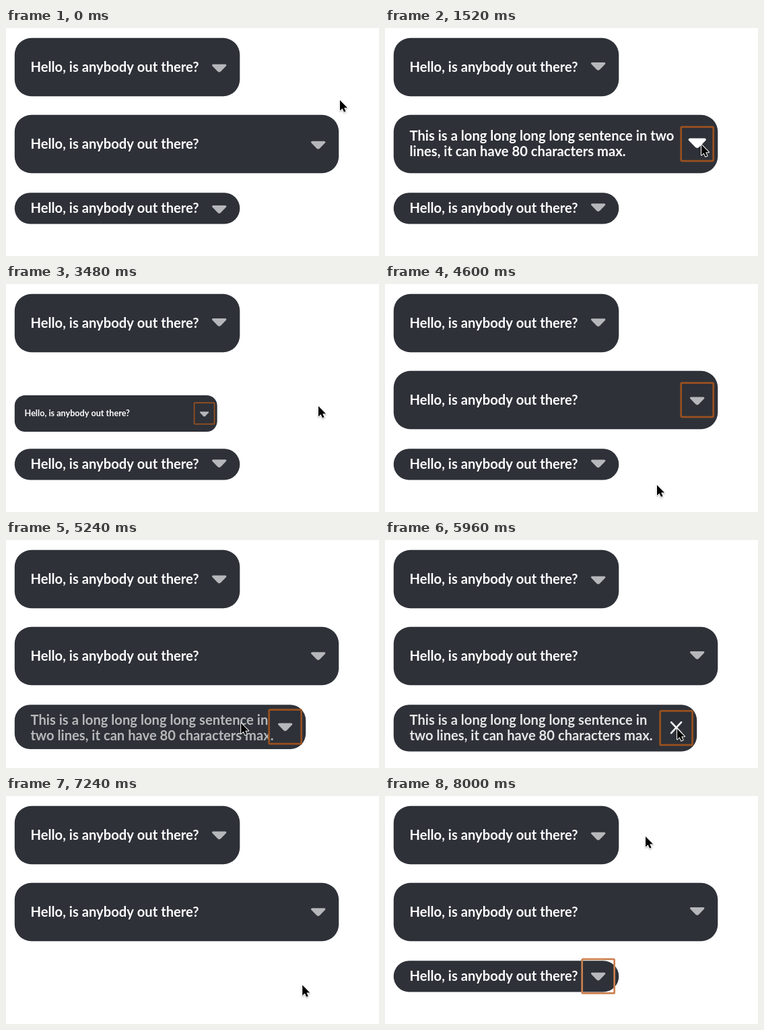
Animation, 554 px wide and 338 px high, one loop 8040 ms. Source, as an HTML page with a canvas:

```html
<!DOCTYPE html>
<html lang="en">
<head>
<meta charset="utf-8">
<title>Speech bubbles</title>
<style>
html, body { margin: 0; width: 100%; height: 100%; overflow: hidden; background: #fff; }
canvas { display: block; width: 554px; height: 338px; }
</style>
</head>
<body>
<canvas id="stage"></canvas>
<script>
const W = 554, H = 338, LOOP = 8040;
const LINE = 23, FADE = 170, POP = 420, CLOSE = 280;
const canvas = document.getElementById('stage');
const ctx = canvas.getContext('2d');
const dpr = window.devicePixelRatio || 1;
canvas.width = W * dpr;
canvas.height = H * dpr;

const hello = ['Hello, is anybody out there?'];
const bubbles = [
  { x: 12.8, y: 14.8, w: 334.5, h: 86.4, r: 25, texts: [hello] },
  {
    x: 12.8, y: 128.8, w: 481.5, h: 86.4, r: 25,
    clicks: [700, 1900, 2600], reopen: 3410, blur: 4960, phase: 500,
    texts: [hello,
      ['This is a long long long long sentence in two', 'lines, it can have 80 characters max.'],
      ["This is the last sentence that's super super", 'super super super long and has 3 lines. it', 'can have 120 characters max.']]
  },
  {
    x: 12.8, y: 244.2, w: 334.5, h: 46.3, r: 23, grow: 450.4,
    clicks: [4960, 5940, 6760], reopen: 7540, blur: LOOP, phase: 250,
    texts: [hello,
      ['This is a long long long long sentence in', 'two lines, it can have 80 characters max.'],
      ["This is the last sentence that's super", 'super super super super long and has 3', 'lines. it can have 120 characters max.']]
  }
];

// time, x, y of the pointer tip
const path = [
  [0, 496, 107], [120, 494, 112], [560, 470, 173], [1640, 470, 173],
  [2700, 467, 174], [3300, 464, 178], [3480, 464, 181], [3800, 500, 214],
  [4200, 500, 256], [4600, 404, 298], [4900, 318, 268], [5080, 319, 269],
  [5560, 434, 279], [5960, 434, 280], [6600, 434, 282], [7000, 434, 282],
  [7520, 448, 278], [7640, 440, 240], [7960, 388, 62], [8000, 387, 60], [8040, 387, 60]
];

const clamp = v => Math.max(0, Math.min(1, v));
const mix = (a, b, p) => a + (b - a) * p;
const smooth = p => p * p * (3 - 2 * p);
const outBack = p => 1 + 2.70158 * (p - 1) ** 3 + 1.70158 * (p - 1) ** 2;
const progress = (t, start, length) => clamp((t - start) / length);

function pointerAt(t) {
  const i = path.findIndex((k, n) => n > 0 && t <= k[0]);
  const a = path[i - 1], b = path[i];
  const p = smooth((t - a[0]) / (b[0] - a[0]));
  return { x: mix(a[1], b[1], p), y: mix(a[2], b[2], p) };
}

function stateAt(b, t) {
  const s = { text: 0, alpha: 1, scale: 1, w: b.w, h: b.h, cross: false, focus: false, bob: 0 };
  if (b.clicks && t >= b.clicks[0]) {
    const [first, second, end] = b.clicks;
    s.focus = t < b.blur;
    if (t >= b.reopen) {
      s.scale = outBack(progress(t, b.reopen, POP));
      s.bob = b.phase;
    } else {
      const click = t < second ? first : second;
      const swap = click + FADE;
      s.text = (t >= first + FADE) + (t >= second + FADE);
      s.alpha = t < swap ? 1 - progress(t, click, FADE) : progress(t, swap, FADE);
      s.cross = t >= second;
      s.scale = 1 - progress(t, end, CLOSE) ** 2;
      if (b.grow) {
        const one = outBack(progress(t, first + FADE, POP));
        const two = outBack(progress(t, second + FADE, POP));
        s.w = mix(b.w, b.grow, one);
        s.h = b.h + LINE * (one + two);
      }
    }
  }
  return s;
}

function drawArrow(x, y, hover) {
  ctx.save();
  ctx.translate(x, y);
  if (hover) ctx.scale(1.22, 1.22);
  ctx.fillStyle = ctx.strokeStyle = hover ? '#fff' : '#b5b7ba';
  ctx.lineWidth = 3;
  ctx.lineJoin = 'round';
  ctx.beginPath();
  ctx.moveTo(-9.2, -4.4);
  ctx.lineTo(9.2, -4.4);
  ctx.lineTo(1.2, 3.8);
  ctx.quadraticCurveTo(0, 4.8, -1.2, 3.8);
  ctx.closePath();
  ctx.fill();
  ctx.stroke();
  ctx.restore();
}

function drawCross(x, y) {
  ctx.strokeStyle = '#f4f4f5';
  ctx.lineWidth = 2.7;
  ctx.lineCap = 'round';
  ctx.beginPath();
  ctx.moveTo(x - 7.5, y - 8);
  ctx.lineTo(x + 7.5, y + 8);
  ctx.moveTo(x + 7.5, y - 8);
  ctx.lineTo(x - 7.5, y + 8);
  ctx.stroke();
}

function drawBubble(b, t, mouse) {
  const s = stateAt(b, t);
  if (s.scale <= 0.005) return;
  const bottom = b.y + s.h;
  ctx.save();
  ctx.translate(b.x, bottom + 10 * (1 - s.scale));
  ctx.scale(s.scale, s.scale);
  ctx.translate(-b.x, -bottom);

  ctx.fillStyle = '#2e3138';
  ctx.beginPath();
  ctx.roundRect(b.x, b.y, s.w, s.h, b.r);
  ctx.fill();

  const lines = b.texts[s.text];
  const top = b.grow ? b.y + 11.8 : b.y + (s.h - LINE * lines.length) / 2;
  ctx.font = '700 20.2px Lato, sans-serif';
  ctx.fillStyle = '#fff';
  ctx.globalAlpha = s.alpha;
  lines.forEach((line, i) => ctx.fillText(line, 36.5, top + 18 + LINE * i));
  ctx.globalAlpha = 1;

  const x = b.x + s.w - 30.6, y = b.y + s.h / 2;
  const hover = s.scale === 1 && Math.abs(mouse.x - x) < 25 && Math.abs(mouse.y - y) < 26;
  if (s.cross) drawCross(x, y - 0.7);
  else drawArrow(x, y + 0.2 + 1.4 * Math.cos((t + s.bob) * Math.PI / 500), hover);

  if (s.focus) {
    ctx.strokeStyle = t >= b.reopen && b.grow ? '#cb804f' : '#98501f';
    ctx.lineWidth = 2.7;
    ctx.beginPath();
    ctx.roundRect(x - 24, y - 25.4, 48, 50.5, 1.5);
    ctx.stroke();
  }
  ctx.restore();
}

function drawPointer({ x, y }) {
  ctx.save();
  ctx.translate(x, y);
  ctx.beginPath();
  ctx.moveTo(0, 0);
  [[0, 15.5], [3.6, 12.2], [6, 17.6], [8.6, 16.5], [6.2, 11.2], [11, 11.2]]
    .forEach(p => ctx.lineTo(...p));
  ctx.closePath();
  ctx.shadowColor = 'rgba(0,0,0,.3)';
  ctx.shadowBlur = 2 * dpr;
  ctx.shadowOffsetY = dpr;
  ctx.lineJoin = 'round';
  ctx.lineWidth = 2;
  ctx.strokeStyle = '#fff';
  ctx.stroke();
  ctx.shadowColor = 'transparent';
  ctx.fillStyle = '#000';
  ctx.fill();
  ctx.restore();
}

function draw(now) {
  const t = Math.max(0, now) % LOOP;
  const mouse = pointerAt(t);
  ctx.setTransform(dpr, 0, 0, dpr, 0, 0);
  ctx.fillStyle = '#fff';
  ctx.fillRect(0, 0, W, H);
  bubbles.forEach(b => drawBubble(b, t, mouse));
  drawPointer(mouse);
}

const start = performance.now();
function tick() {
  draw(performance.now() - start);
  requestAnimationFrame(tick);
}
tick();
</script>
</body>
</html>
```
